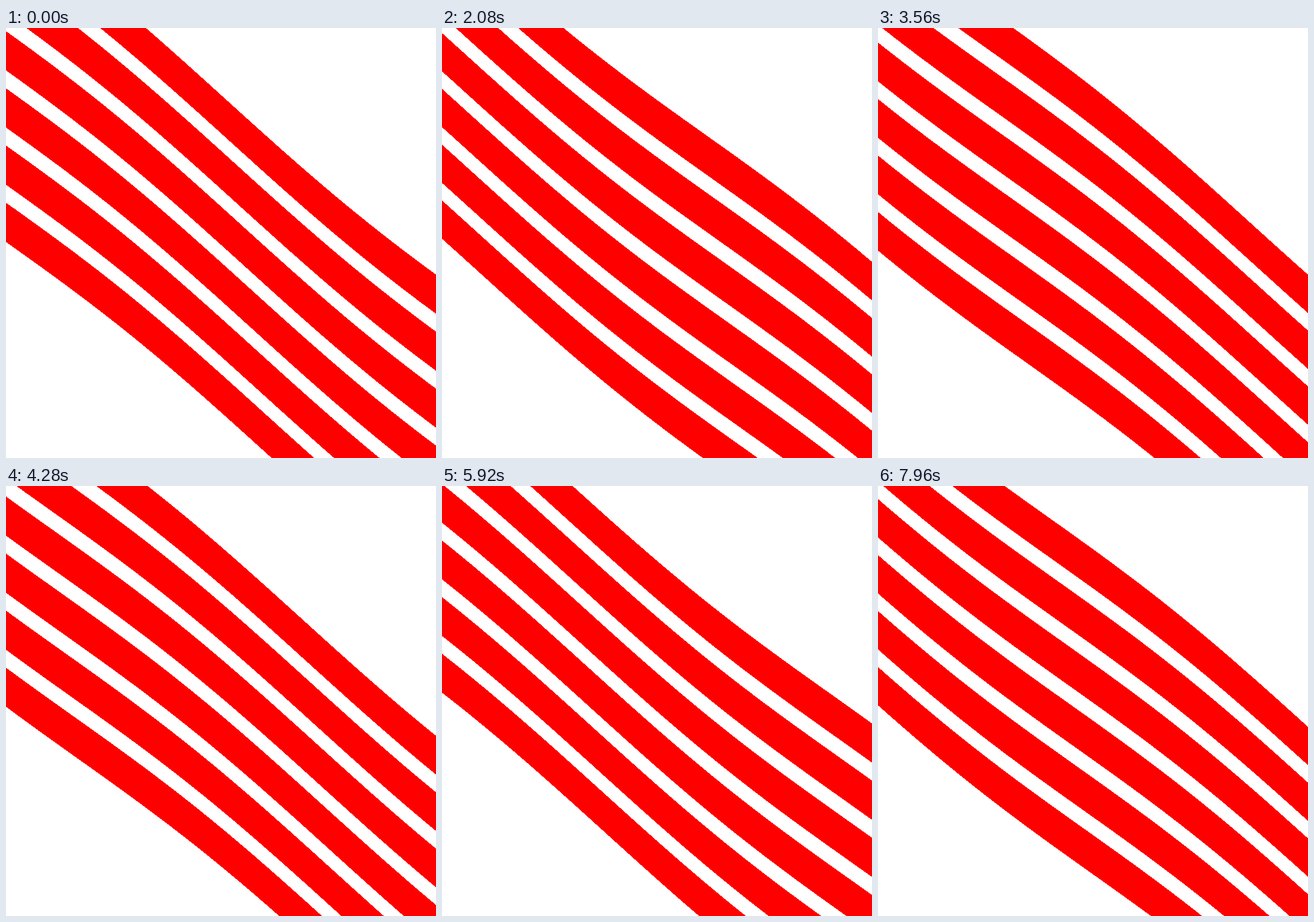
Recreate the animation shown at these times as an HTML page with a canvas. Size 700x700 px, loop 8 s.

```html
<!DOCTYPE html>
<html lang="en">
<head>
<meta charset="utf-8">
<title>Waving stripes</title>
<style>
  html, body { margin: 0; width: 100%; height: 100%; overflow: hidden; background: #fff; }
  canvas { display: block; width: 700px; height: 700px; }
</style>
</head>
<body>
<canvas id="stage" width="700" height="700"></canvas>
<script>
const SIZE = 700;
const LOOP = 8000;
const STEP = 40;
const WAVE_PERIOD = 5000;

const STRIPES = 6;
const PITCH = 91.95;
const THICKNESS = 63.1;
const TOP = -173.7;
const SLOPE = 0.8098;

const AMPLITUDE = 13.5;
const KX = 0.00802;
const KY = -0.00095;
const PHASE_0 = -1.182;

const ctx = document.getElementById('stage').getContext('2d');

// The wave phase depends on y too, so the height is found by iteration.
function edgeY(x, offset, phase) {
  const base = offset + SLOPE * x;
  let y = base;
  for (let i = 0; i < 3; i++) {
    y = base - AMPLITUDE * Math.cos(phase + KX * x + KY * y + PHASE_0);
  }
  return Math.round(y);
}

function draw(time) {
  const stepped = Math.floor((time % LOOP) / STEP) * STEP;
  const phase = 2 * Math.PI * stepped / WAVE_PERIOD;
  ctx.fillStyle = '#fff';
  ctx.fillRect(0, 0, SIZE, SIZE);
  ctx.fillStyle = '#f00';
  // Whole-pixel columns keep the edges hard.
  for (let x = 0; x < SIZE; x++) {
    for (let n = 0; n < STRIPES; n++) {
      const offset = TOP + n * PITCH;
      const y = edgeY(x + 0.5, offset, phase);
      const end = edgeY(x + 0.5, offset + THICKNESS, phase);
      ctx.fillRect(x, y, 1, end - y);
    }
  }
}

const start = performance.now();
function tick() {
  draw(performance.now() - start);
  requestAnimationFrame(tick);
}
tick();
</script>
</body>
</html>
```
